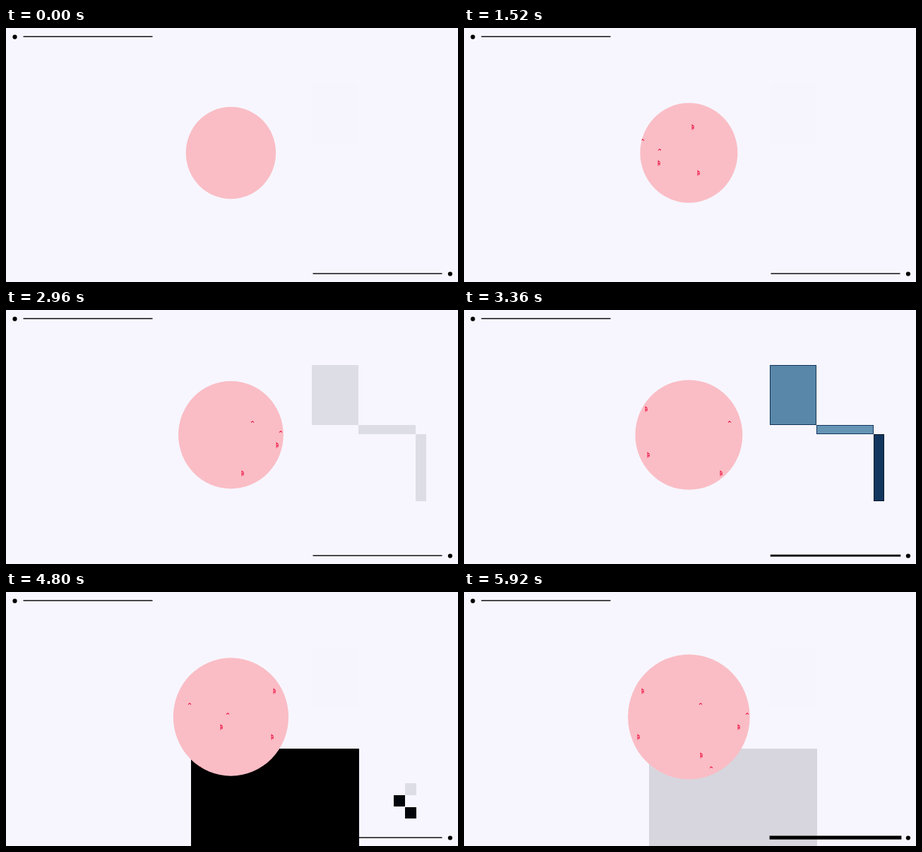
Recreate the animation shown at these times as an HTML page with a canvas. Size 640x360 px, loop 6000 ms.

```html
<!DOCTYPE html>
<html lang="en">
<head>
<meta charset="utf-8">
<title>Rising circle</title>
<style>
html, body { margin: 0; width: 100%; height: 100%; overflow: hidden; background: #f7f6ff; }
canvas { display: block; width: 640px; height: 360px; }
</style>
</head>
<body>
<canvas id="stage" width="640" height="360"></canvas>
<script>
const ctx = document.getElementById('stage').getContext('2d');
const LOOP = 6000, STEP = 80, FADE = 0.2, FLASH = 0.84;

const clamp = v => Math.max(0, Math.min(1, v));
const pulse = (t, at, half) => Math.max(0, 1 - Math.abs(t - at) / half);

// 0 is black, 0.5 navy, 1 steel blue
function shade(tone) {
  const low = clamp(tone * 2), high = clamp(tone * 2 - 1);
  const mix = (navy, steel) => Math.round(navy * low + (steel - navy) * high);
  return `rgb(${mix(18, 101)}, ${mix(54, 148)}, ${mix(94, 181)})`;
}

// Fades in black, brightens to the given tone halfway, then goes back
function flash(t, start, life, tone, x, y, w, h) {
  const half = life / 2;
  const left = half - Math.abs(t - start - half);
  if (left <= 0) return;
  const lit = tone * clamp((left - FADE) / (half - FADE));
  ctx.globalAlpha = clamp(left / FADE);
  ctx.fillStyle = shade(lit * 0.5);
  ctx.fillRect(x, y, w, h);
  ctx.fillStyle = shade(lit);
  ctx.clearRect(x + 1, y + 1, w - 2, h - 2);
  ctx.fillRect(x + 1, y + 1, w - 2, h - 2);
  ctx.globalAlpha = 1;
}

function drawBlocks(t) {
  flash(t, 0.54, FLASH, 0.7, 32, 263, 54, 54);
  flash(t, 0.54, FLASH, 1, 86, 316, 20, 19);
  flash(t, 0.54, FLASH, 0.42, 106, 244, 98, 72);

  flash(t, 1.88, FLASH, 0.7, 499, 42, 89, 36);

  flash(t, 2.94, FLASH, 0.93, 433, 78, 66, 85);
  flash(t, 2.94, FLASH, 1, 499, 163, 81, 13);
  flash(t, 2.94, FLASH, 0.5, 580, 176, 15, 95);

  flash(t, 4.58, FLASH, 0.58, 549, 288, 16, 16);
  flash(t, 4.58, FLASH, 0.58, 565, 305, 16, 16);
  flash(t, 4.78, 0.64, 0.58, 565, 271, 16, 17);
  flash(t, 4.6, 1.346, 0.9, 262, 222, 238, 139);
}

const tall = new Path2D('M-1-4V4M1-2V3M-1-3L2-1M-1 1H2');
const small = new Path2D('M-2 1L0-1L2 1');

function drawMark(t, path, y, from, speed) {
  // Faster marks travel a little further before they come round again
  const wrap = 176 + 0.55 * speed;
  let x = from + speed * t;
  while (x > 430) x -= wrap;
  ctx.save();
  ctx.translate(Math.round(x), y + 0.5);
  ctx.lineWidth = 2.4;
  ctx.strokeStyle = 'rgba(255, 220, 226, 0.5)';
  ctx.stroke(path);
  ctx.lineWidth = 1.1;
  ctx.strokeStyle = '#f01c48';
  ctx.stroke(path);
  ctx.restore();
}

function drawCircle(t) {
  const r = 63.7 + 3.4 * t + 0.07 * t * t;
  ctx.save();
  ctx.beginPath();
  ctx.ellipse(318.4, 177, r, r * 1.025, 0, 0, Math.PI * 2);
  ctx.fillStyle = '#fabdc5';
  ctx.fill();
  ctx.clip();
  drawMark(t, tall, 140, 195, 85);
  drawMark(t, small, 158, 151, 67);
  drawMark(t, small, 172, 158, 78);
  drawMark(t, tall, 191, 162, 75);
  drawMark(t, tall, 205, 209, 81);
  drawMark(t, tall, 231, 117, 73.5);
  drawMark(t, small, 248, 166, 67);
  ctx.restore();
}

function drawRule(x, y, dotX, dotY, grow) {
  ctx.fillStyle = '#000';
  ctx.fillRect(x - grow, y - 0.7 - grow, 183 + 2 * grow, 1.4 + 2 * grow);
  ctx.beginPath();
  ctx.arc(dotX, dotY, 3.1, 0, Math.PI * 2);
  ctx.fill();
}

function draw(t) {
  ctx.fillStyle = '#f7f6ff';
  ctx.fillRect(0, 0, 640, 360);
  ctx.fillStyle = '#f6f5fd';
  ctx.fillRect(433, 78, 66, 85);
  drawBlocks(t);
  drawCircle(t);

  const top = Math.max(...[0.8, 2.16, 5.84].map(at => pulse(t, at, 0.07)));
  const bottom = pulse((t + 0.58) % 2.6, 1.3, 0.065);
  drawRule(24.5, 12.2, 12.5, 12.7, 1.9 * top);
  drawRule(434.5, 348.1, 628.9, 348.5, 1.9 * bottom);
}

const begin = performance.now();
function tick() {
  const ms = Math.max(0, performance.now() - begin) % LOOP;
  draw(Math.floor(ms / STEP) * STEP / 1000);
  requestAnimationFrame(tick);
}
tick();
</script>
</body>
</html>
```
